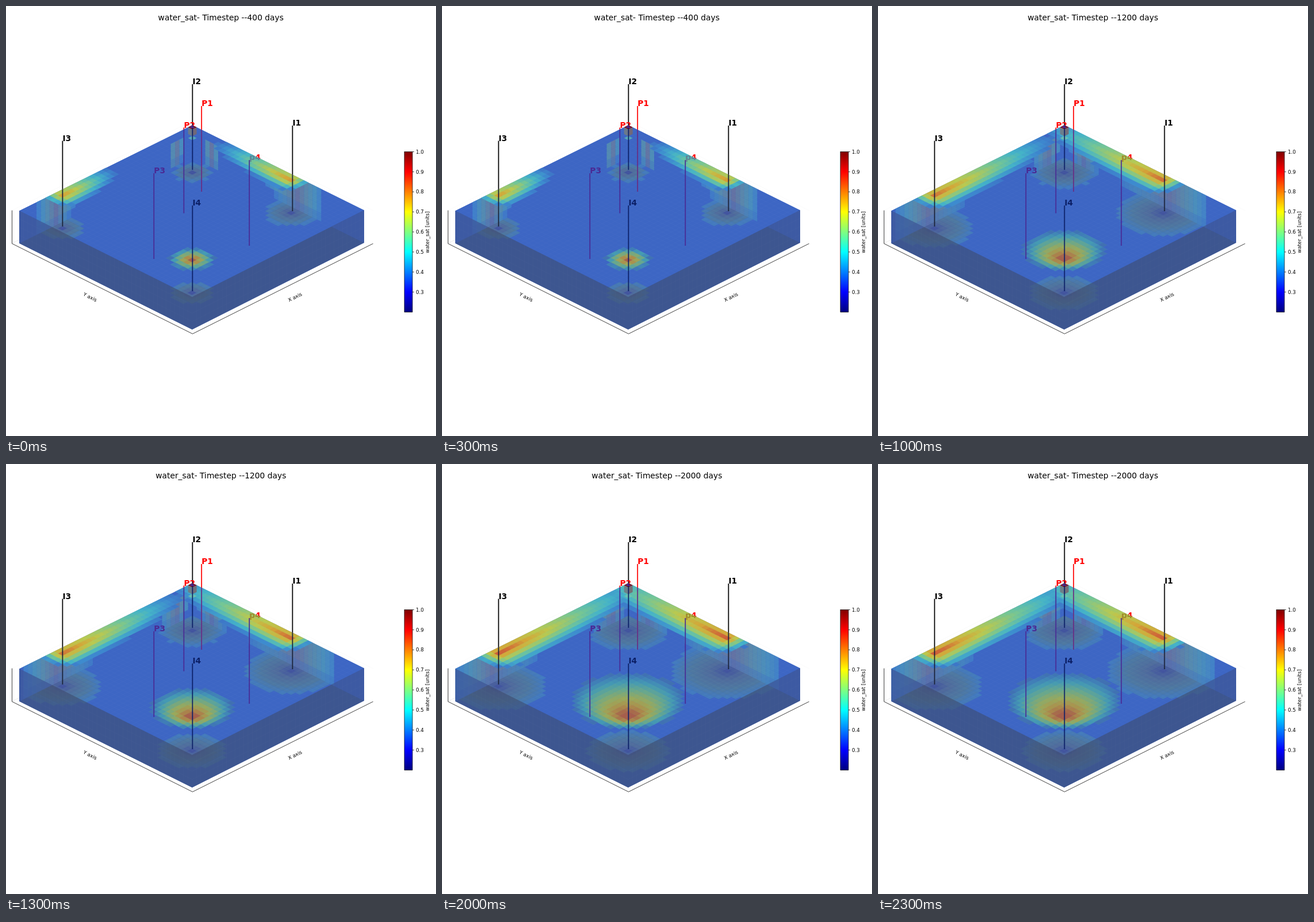
Animation of 748x748 px, one loop 2.5 s. Source, as an HTML page with a canvas:

```html
<!DOCTYPE html>
<html lang="en">
<head>
<meta charset="utf-8">
<title>water_sat</title>
<style>
  html, body { margin: 0; width: 100%; height: 100%; overflow: hidden; background: #fff; }
  canvas { display: block; width: 748px; height: 748px; }
</style>
</head>
<body>
<canvas id="view" width="748" height="748"></canvas>
<script>
const ctx = document.getElementById('view').getContext('2d');
const N = 40, DEPTH = 57, LAYERS = 4;
const FONT = '"DejaVu Sans", sans-serif';
const BLUE = [61, 102, 196], SHADE = [63, 75, 111];

// Colour ramps: [position, r, g, b]
const TOP_RAMP = [[0, ...BLUE], [.2, 60, 140, 212], [.4, 68, 185, 205], [.6, 120, 205, 150],
  [.8, 195, 208, 75], [.92, 222, 170, 50], [1, 215, 95, 50]];
const FLOOR_RAMP = [[0, 66, 84, 158], [.3, 80, 108, 156], [.65, 78, 120, 160], [1, 66, 122, 192]];
const WALL_RAMP = [[0, 116, 120, 150], [.4, 100, 152, 162], [.7, 80, 160, 185], [1, 66, 138, 206]];
const JET = [[0, 0, 0, 128], [.125, 0, 0, 255], [.375, 0, 255, 255],
  [.625, 255, 255, 0], [.875, 255, 0, 0], [1, 128, 0, 0]];

// Plumes on the top face; arrays hold one value per time step
const STREAKS = [
  { u: 24.5, v: 1.5, alongU: true, up: [17, 24, 29, 32, 34], down: [2.8, 3.2, 3.5, 3.8, 4],
    side: [3.3, 4, 4.4, 4.7, 5], peak: [.93, .96, .98, 1, 1] },
  { u: 1.5, v: 31.5, alongU: false, up: [11.5, 20, 27, 32, 34], down: [2.8, 3.2, 3.5, 3.7, 3.8],
    side: [3.5, 4, 4.4, 4.7, 5], peak: [.92, .95, .97, .99, 1] }
];
const POOL = { u: 31.5, v: 31.5, shift: [.2, 1.5, 2.3, 3.1, 4], radius: [3.6, 5.6, 6.6, 7.8, 9.1] };

const FLOOR_POOLS = [
  { u: 24.5, v: 1.5, radius: [4.2, 6.3, 7.6, 8.6, 9.1] },
  { u: 3.5, v: 3.5, radius: [3, 4.3, 5, 5.6, 6.4] },
  { u: 1.5, v: 31.5, radius: [3.6, 5, 6.2, 6.9, 7.7] },
  { u: 31.5, v: 31.5, radius: [3.6, 5, 5.6, 6.1, 6.7] }
];

const WALL_PLUMES = [
  { right: true, at: 24.5, near: [7, 13, 15, 15.5, 15.5], far: [5.5, 7.5, 8.8, 9.8, 10.8], first: 0 },
  { right: false, at: 31.5, near: [4, 9, 11, 13, 14], far: [4, 6, 7, 8, 8], first: 0 },
  { right: true, at: 4.4, near: [1.8, 2.4, 3, 3.4, 3.8], far: [1.8, 2.6, 3.4, 4.2, 5], first: 1 },
  { right: false, at: 3.7, near: [1.6, 2.2, 2.8, 3.2, 3.4], far: [1.6, 2.6, 3.4, 4, 4.6], first: 1 }
];

const RED = '#f00', VEILED_RED = '#4a2a94', NAVY = '#0b1f66', SLATE = '#1a2238';
const WELLS = [
  ['I1', 498.4, 208, '#000', SLATE], ['I2', 324.4, 136, '#000', NAVY],
  ['I3', 98.4, 234.5, '#000', SLATE], ['I4', 324.4, 347, '#000', NAVY],
  ['P1', 340.2, 174, RED, '#6a2c82'], ['P2', 309.4, 211.5, RED, VEILED_RED],
  ['P3', 257.3, 291, RED, VEILED_RED], ['p4', 423.3, 268, RED, VEILED_RED]
];

const rgb = (c, a = 1) => `rgba(${c.map(Math.round).join(',')},${a})`;
const mix = (a, b, k) => a.map((x, i) => x + (b[i] - x) * k);

// The uv term is the slight perspective towards the front corner
const point = (u, v, z = 0) => {
  const near = u * v / 800;
  return [324.2 + 7.47 * u - 7.53 * v + near, 207 + 3.7 * u + 3.725 * v + near + z];
};

function ramp(stops, x) {
  let i = 1;
  while (i < stops.length - 1 && x > stops[i][0]) i++;
  const [a, b] = [stops[i - 1], stops[i]];
  const k = Math.min(1, Math.max(0, (x - a[0]) / (b[0] - a[0])));
  return mix(a.slice(1), b.slice(1), k);
}

function trace(points, close = true) {
  ctx.beginPath();
  points.forEach(p => ctx.lineTo(...p));
  if (close) ctx.closePath();
}

function fill(points, color) {
  trace(points);
  ctx.fillStyle = color;
  ctx.fill();
}

// Opaque cell whose thin stroke hides the seam to its neighbours
function fillCell(points, color) {
  fill(points, color);
  ctx.strokeStyle = color;
  ctx.lineWidth = .6;
  ctx.stroke();
}

function line(points, color, width) {
  trace(points, false);
  ctx.strokeStyle = color;
  ctx.lineWidth = width;
  ctx.stroke();
}

function text(str, x, y, size, { color = '#000', align = 'center', angle = 0, weight = '' } = {}) {
  ctx.save();
  ctx.translate(x, y);
  ctx.rotate(angle);
  ctx.font = `${weight} ${size}px ${FONT}`;
  ctx.textAlign = align;
  ctx.fillStyle = color;
  ctx.fillText(str, 0, 0);
  ctx.restore();
}

const tile = (u, v, z = 0) =>
  [point(u, v, z), point(u + 1, v, z), point(u + 1, v + 1, z), point(u, v + 1, z)];
const frontFaces = [point(0, N), point(N, N), point(N, 0), point(N, 0, DEPTH), point(N, N, DEPTH), point(0, N, DEPTH)];
const outline = [point(0, 0), point(N, 0), point(N, 0, DEPTH), point(N, N, DEPTH), point(0, N, DEPTH), point(0, N)];

function eachCell(visit) {
  for (let u = 0; u < N; u++) for (let v = 0; v < N; v++) visit(u, v);
}

// 0 at the peak, 1 on the rim of a circle whose centre is offset by (du, dv), in radii
function rimFraction(x, y, du, dv) {
  const dot = x * du + y * dv, rest = 1 - du * du - dv * dv;
  return (-dot + Math.sqrt(dot * dot + rest * (x * x + y * y))) / rest;
}

const saturation = (f, peak, power) => f > 1 ? 0 : peak - (peak - .1) * f ** power;

function streakValue(p, u, v, step) {
  const [along, across] = p.alongU ? [u - p.u, v - p.v] : [v - p.v, u - p.u];
  const reach = along < 0 ? p.up[step] : p.down[step];
  return saturation(Math.hypot(along / reach, across / p.side[step]), p.peak[step], 1.4);
}

function poolValue(u, v, step) {
  const r = POOL.radius[step], d = -POOL.shift[step] / r;
  return saturation(rimFraction((u - POOL.u) / r, (v - POOL.v) / r, d, d), 1.02, 1.7);
}

function drawFloor(step) {
  for (const p of FLOOR_POOLS) eachCell((u, v) => {
    const f = Math.hypot(u + .5 - p.u, v + .5 - p.v) / p.radius[step];
    if (f <= 1) fillCell(tile(u, v, DEPTH), rgb(ramp(FLOOR_RAMP, f)));
  });
}

function drawWalls(step) {
  const h = DEPTH / LAYERS;
  for (const p of WALL_PLUMES) {
    const corner = (i, z) => p.right ? point(i, 0, z) : point(0, i, z);
    for (let layer = p.first; layer < LAYERS; layer++) {
      const last = layer === LAYERS - 1;
      for (let i = 0; i < N; i++) {
        const d = i + .5 - p.at;
        const f = Math.abs(d) / (d < 0 ? p.near[step] * (last ? .75 : 1) : p.far[step]);
        if (f > 1) continue;
        const z = layer * h;
        fill([corner(i, z), corner(i + 1, z), corner(i + 1, z + h), corner(i, z + h)],
          rgb(ramp(WALL_RAMP, f), last ? .5 : .7));
      }
    }
  }
}

// Both front faces, lighter where a back wall stands behind them
function drawFrontFaces() {
  fill(frontFaces, rgb(SHADE, .6));
  const behind = 32.4, glow = 'rgba(62,100,220,.25)';
  fill([point(N, 0), point(behind, 0, DEPTH), point(N, 0, DEPTH)], glow);
  fill([point(0, N), point(0, behind, DEPTH), point(0, N, DEPTH)], glow);
}

function drawTop(step) {
  eachCell((u, v) => {
    const streak = Math.max(...STREAKS.map(p => streakValue(p, u + .5, v + .5, step)));
    const pool = poolValue(u + .5, v + .5, step);
    const s = Math.max(streak, pool);
    if (s <= 0) return;
    const color = ramp(TOP_RAMP, s);
    fillCell(tile(u, v), rgb(mix(color, [70, 92, 125], pool > streak ? .33 : .06)));
  });
}

function drawCornerColumn(step) {
  fill(tile(0, 0, 19), step ? 'rgba(110,195,175,.9)' : 'rgba(90,175,180,.9)');
  fill([point(0, 1), point(1, 1), point(1, 1, 12), point(0, 1, 12)], 'rgba(112,122,132,.9)');
  fill([point(1, 0), point(1, 1), point(1, 1, 12), point(1, 0, 12)], 'rgba(118,104,112,.9)');
  fill(tile(0, 0), '#8a0c0c');
}

function drawLattice() {
  const faint = 'rgba(255,255,255,.03)';
  for (let i = 1; i < N; i++) {
    line([point(0, i), point(N, i), point(N, i, DEPTH)], faint, .7);
    line([point(i, 0), point(i, N), point(i, N, DEPTH)], faint, .7);
  }
  for (let k = 1; k < LAYERS; k++) {
    const z = k * DEPTH / LAYERS;
    line([point(0, N, z), point(N, N, z), point(N, 0, z)], faint, .7);
  }
}

function drawWells(step) {
  const draw = veiled => WELLS.forEach(([name, x, y, color, inside]) => {
    line([[x, y], [x, y + 149]], veiled ? inside : color, 1.73);
    const labelInside = name === 'p4' ? (step ? '#a08a2c' : '#5f8296') : inside;
    text(name, x, y, 13.83, { color: veiled ? labelInside : color, align: 'left', weight: 'bold' });
  });
  const clipped = (paths, veiled) => {
    ctx.save();
    ctx.beginPath();
    paths.forEach(path => {
      path.forEach((p, i) => i ? ctx.lineTo(...p) : ctx.moveTo(...p));
      ctx.closePath();
    });
    ctx.clip('evenodd');
    draw(veiled);
    ctx.restore();
  };
  clipped([[[0, 0], [748, 0], [748, 748], [0, 748]], outline], false);
  clipped([outline], true);
}

function drawAxes() {
  line([[10, 356], [324, 200], [639, 356]], 'rgba(0,0,0,.035)', .7);
  line([[10, 413], [23, 406.5]], '#e4e4e4', .7);
  line([[10.5, 355.5], [10.5, 413.3], [324.5, 570.3], [638.5, 413.3]], '#000', .75);
  text('X axis', 504, 509, 8.64, { angle: -.463 });
  text('Y axis', 145, 509, 8.64, { angle: .463 });
}

function drawColorbar() {
  const x = 693, y = 253.5, w = 14, h = 279;
  const gradient = ctx.createLinearGradient(0, y + h, 0, y);
  JET.forEach(([at, ...c]) => gradient.addColorStop(at, rgb(c)));
  ctx.fillStyle = gradient;
  ctx.fillRect(x, y, w, h);
  ctx.strokeStyle = '#000';
  ctx.lineWidth = .7;
  ctx.strokeRect(x, y, w, h);
  for (let i = 0; i < 8; i++) {
    const ty = y + i * h / 8;
    line([[x + w, ty], [x + w + 3, ty]], '#000', .7);
    text((1 - i / 10).toFixed(1), 713, ty + 3.2, 8.64, { align: 'left' });
  }
  text('water_sat [units]', 736, 393.5, 8.64, { angle: -Math.PI / 2 });
}

function drawScene(step) {
  ctx.fillStyle = '#fff';
  ctx.fillRect(0, 0, 748, 748);
  drawAxes();
  ctx.save();
  trace(outline);
  ctx.clip();
  fill(outline, rgb(BLUE));
  drawFloor(step);
  drawWalls(step);
  drawFrontFaces();
  drawTop(step);
  drawCornerColumn(step);
  drawLattice();
  ctx.restore();
  drawWells(step);
  drawColorbar();
  text(`water_sat- Timestep --${(step + 1) * 400} days`, 373.8, 25, 13.83);
}

let shown = -1;
function tick() {
  const step = Math.floor(performance.now() % 2500 / 500);
  if (step !== shown) drawScene(shown = step);
  requestAnimationFrame(tick);
}
tick();
</script>
</body>
</html>
```
